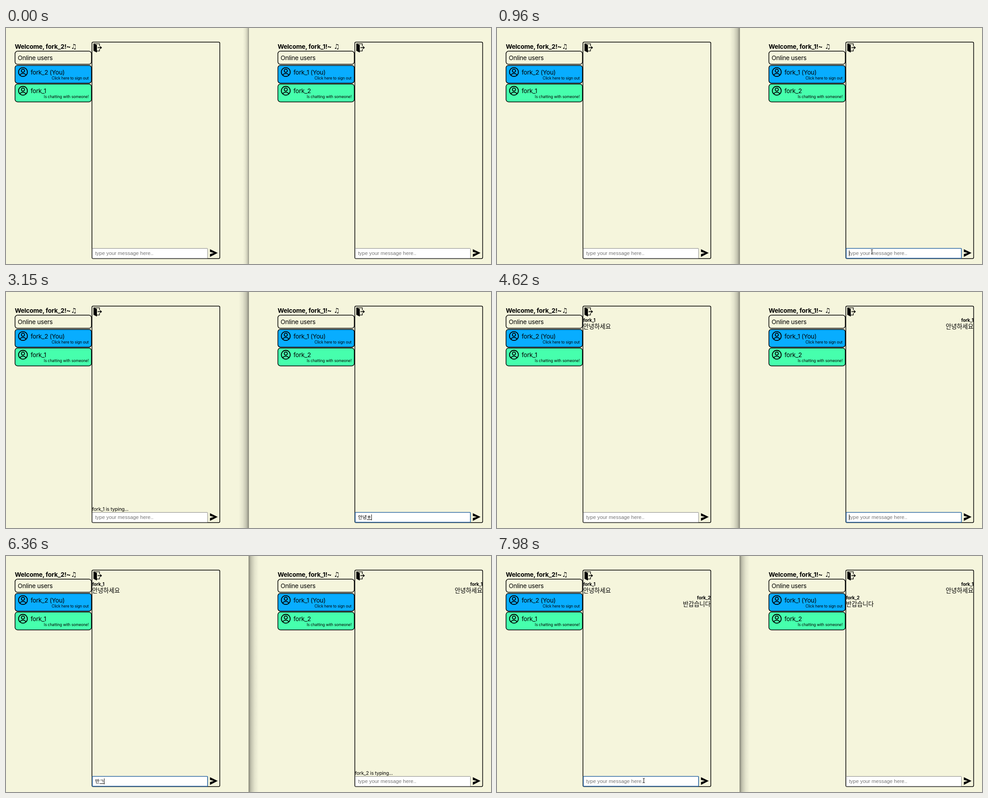
Recreate the animation shown at these times as an HTML page. Size 1073 by 522 pixels, loop 8 s.

```html
<!DOCTYPE html>
<html lang="ko">
<head>
<meta charset="utf-8">
<title>Chat demo</title>
<style>
html, body { margin: 0; width: 100%; height: 100%; overflow: hidden; background: #f5f5dc; }
svg { display: block; width: 1073px; height: 522px; }
text { font-family: Inter, "Noto Sans CJK KR", sans-serif; font-size: 13.7px; letter-spacing: -.3px; white-space: pre; }
.title { font-weight: 700; letter-spacing: -.17px; }
.note { font-family: "DejaVu Sans", sans-serif; font-size: 14.5px; }
.small { font-size: 8.4px; letter-spacing: -.08px; }
.from { font-size: 9.9px; font-weight: 700; letter-spacing: -.1px; }
.typing { font-size: 10.8px; letter-spacing: -.2px; }
.msg { font-family: "Noto Sans CJK KR", "Noto Sans CJK", sans-serif; font-size: 13.37px; letter-spacing: 0; }
.hint { font-family: "Liberation Sans", Arial, sans-serif; font-size: 11.43px; letter-spacing: 0; fill: #757575; }
.draft { font-family: "Noto Sans CJK KR", "Noto Sans CJK", sans-serif; font-size: 10.7px; letter-spacing: 0; }
.end { text-anchor: end; }
.box { stroke: #000; stroke-width: 1.5; }
.line { fill: none; stroke: #000; }
</style>
</head>
<body>
<svg id="stage" viewBox="0 0 1073 522">
  <defs>
    <linearGradient id="shade">
      <stop offset="0" stop-color="#000" stop-opacity="0"/>
      <stop offset=".4" stop-color="#000" stop-opacity=".07"/>
      <stop offset=".75" stop-color="#000" stop-opacity=".2"/>
      <stop offset="1" stop-color="#000" stop-opacity=".42"/>
    </linearGradient>
    <g id="user" class="line" stroke-width="1.8">
      <circle r="9.8"/>
      <circle cy="-2.7" r="3.5"/>
      <path d="M-6.3 7.3C-5.4 1.9 5.4 1.9 6.3 7.3"/>
    </g>
    <g id="door">
      <path d="M193.5 34.3L201.2 37.6V54.2L193.5 50.6Z"/>
      <path class="line" stroke-width="1.3" d="M194 34.9H206.8V40.3M206.8 46.6V50.9H201"/>
      <path class="line" stroke-width="1.7" d="M202.8 43.4H210"/>
      <path d="M208.4 39.8L212.4 43.4L208.4 47Z"/>
    </g>
    <path id="send" d="M451.3 489.2L468.4 497.6L451.3 506.2V500L460 497.6L451.3 495.3Z"/>
  </defs>
  <g id="panels"></g>
  <g id="shadows">
    <rect id="weak" x="524" width="13" height="522" fill="url(#shade)" opacity=".8"/>
    <rect id="strong" x="515" width="22" height="522" fill="url(#shade)"/>
    <rect id="flip" x="-559" width="22" height="522" fill="url(#shade)" transform="scale(-1 1)"/>
    <rect x="536.5" width="1" height="522" fill="#000" opacity=".28"/>
  </g>
  <g id="cursor">
    <circle id="ring" class="line" stroke-width="1.1"/>
    <path id="arrow" d="M.4 0V8.2L2.3 6.5L3.6 9.3L4.9 8.7L3.6 6H6.1Z" fill="#000" stroke="#fff" stroke-width=".7"/>
    <path id="beam" class="line" stroke-width="1" d="M-2 -5Q0 -5 0 -3.6Q0 -5 2 -5M0 -4V4M-2 5Q0 5 0 3.6Q0 5 2 5"/>
  </g>
</svg>
<script>
const LOOP = 8000, SHIFT = 581.5, GLYPH = 9.84;
const $ = id => document.getElementById(id);
const show = (el, on) => el.setAttribute("visibility", on ? "visible" : "hidden");
const within = (t, a, b) => t >= a && t < b;

const parseKeys = s => s.split(",").map(k => {
  const [at, text] = k.split(" ");
  return { at: +at, text };
});

const people = [
  {
    name: "fork_2", peer: "fork_1", dx: 0, focus: [5340, LOOP], sent: 7290,
    peerTyping: [2700, 4260], carets: [[5340, 5850], [6150, 7740]],
    keys: parseKeys("6150 ㅂ,6210 바,6300 반,6360 반ㄱ,6450 반가,6540 반갑,6600 반갑ㅅ,6690 반갑스,6780 반갑습,6840 반갑습ㄴ,6930 반갑습니,6990 반갑습니다"),
    inbox: [["fork_1", "안녕하세요", 4170, false], ["fork_2", "반갑습니다", 7290, true]]
  },
  {
    name: "fork_1", peer: "fork_2", dx: SHIFT, focus: [690, 5070], sent: 4110,
    peerTyping: [6240, 7950], carets: [[690, 1350], [1770, 2220], [2640, 5070]],
    keys: parseKeys("2640 ㅇ,2700 아,2790 안,2880 안ㄴ,2970 안녀,3060 안녕,3120 안녕ㅎ,3270 안녕하,3450 안녕핫,3510 안녕하세,3660 안녕하세요"),
    inbox: [["fork_1", "안녕하세요", 4110, true], ["fork_2", "반갑습니다", 7350, false]]
  }
];

const text = (cls, x, y, s) => `<text class="${cls}" x="${x}" y="${y}">${s}</text>`;
const box = (y, h, fill) =>
  `<rect class="box" x="20" y="${y}" width="169" height="${h}" rx="5.5" fill="${fill}"/>`;
const card = (y, fill, name, status) => box(y, 39.3, fill) +
  `<use href="#user" x="37.5" y="${y + 14.7}"/>` +
  text("", 54.5, y + 19.9, name) + text("small end", 183, y + 31.3, status);

function message([from, body, , mine], i) {
  const x = mine ? 472.6 : 190.7, end = mine ? " end" : "", y = i * 30;
  return `<g class="entry">${text("from" + end, x, 66 + y, from)}${text("msg" + end, x, 80.8 + y, body)}</g>`;
}

function panel(p) {
  const g = document.createElementNS("http://www.w3.org/2000/svg", "g");
  g.setAttribute("transform", `translate(${p.dx} 0)`);
  g.innerHTML =
    text("title", 19.5, 45.5, `Welcome, ${p.name}!~`) + text("note", 143.5, 45.5, "♫") +
    box(51.3, 29, "none") + text("", 26, 71, "Online users") +
    card(82.7, "#08adff", p.name + " (You)", "Click here to sign out") +
    card(124.1, "#46ffad", p.peer, "Is chatting with someone!") +
    `<rect class="box" x="190.2" y="31.2" width="282.8" height="478.8" rx="2.5" fill="none"/>
     <use href="#door"/><use href="#send"/>` +
    p.inbox.map(message).join("") +
    `<g class="peer">${text("typing", 190.6, 484, p.peer + " is typing...")}</g>
     <rect class="field" x="191" y="487.5" width="255" height="21.8" rx="1" fill="#fff"/>` +
    text("hint", 197.2, 502, "type your message here..") + text("draft", 197.2, 501.6, "") +
    `<rect class="under" y="503" width="${GLYPH}" height="1"/>
     <rect class="caret" y="492" width="1" height="13"/>`;
  $("panels").append(g);
  const part = c => g.querySelector("." + c);
  const entries = g.querySelectorAll(".entry");
  const [peer, field, hint, draft, under, caret] =
    ["peer", "field", "hint", "draft", "under", "caret"].map(part);

  return t => {
    const key = t < p.sent && p.keys.filter(k => k.at <= t).pop();
    const typed = key ? key.text : "";
    const focused = within(t, ...p.focus);
    entries.forEach((e, i) => show(e, t >= p.inbox[i][2]));
    show(peer, within(t, ...p.peerTyping));
    field.setAttribute("stroke", focused ? "#2f69a3" : "#858585");
    field.setAttribute("stroke-width", focused ? 1.7 : 1);
    show(hint, !typed);
    draft.textContent = typed;
    show(under, typed);
    under.setAttribute("x", 197.2 + GLYPH * (typed.length - 1));
    caret.setAttribute("x", 197.2 + GLYPH * typed.length);
    show(caret, p.carets.some(c => within(t, ...c)));
  };
}

// time, x, y
const path = [
  [300, 806, 530], [600, 829.5, 495], [4650, 829.5, 495], [5040, 377, 491.5],
  [5150, 377, 491.5], [5310, 324.8, 496.7], [LOOP, 324.8, 496.7]
];
const clicks = [[660, 930], [5070, 5220], [5310, 5460]];

function pointer(t) {
  const i = Math.max(1, path.findIndex(p => p[0] > t));
  const [a, b] = [path[i - 1], path[i]];
  const u = Math.min(1, Math.max(0, (t - a[0]) / (b[0] - a[0])));
  const e = u * u * (3 - 2 * u);
  return [a[1] + (b[1] - a[1]) * e, a[2] + (b[2] - a[2]) * e];
}

function drawCursor(t) {
  const on = within(t, 300, 2640) || within(t, 4650, 6150) || t >= 7950;
  const [x, y] = pointer(t);
  const beam = within(t, 690, 5070) ? x > 772 : t >= 5220;
  const click = clicks.find(c => within(t, ...c));
  $("cursor").setAttribute("transform", `translate(${x} ${y})`);
  show($("beam"), on && beam);
  show($("arrow"), on && !beam);
  show($("ring"), on && click);
  if (click) {
    const u = (t - click[0]) / (click[1] - click[0]);
    $("ring").setAttribute("r", 12.2 - 2 * Math.max(0, u - .5) * 1.8);
  }
}

const panels = people.map(panel);

function frame() {
  const t = performance.now() % LOOP;
  panels.forEach(draw => draw(t));
  show($("weak"), t < 660);
  show($("strong"), within(t, 660, 5070));
  show($("flip"), t >= 5070);
  drawCursor(t);
  requestAnimationFrame(frame);
}
frame();
</script>
</body>
</html>
```
